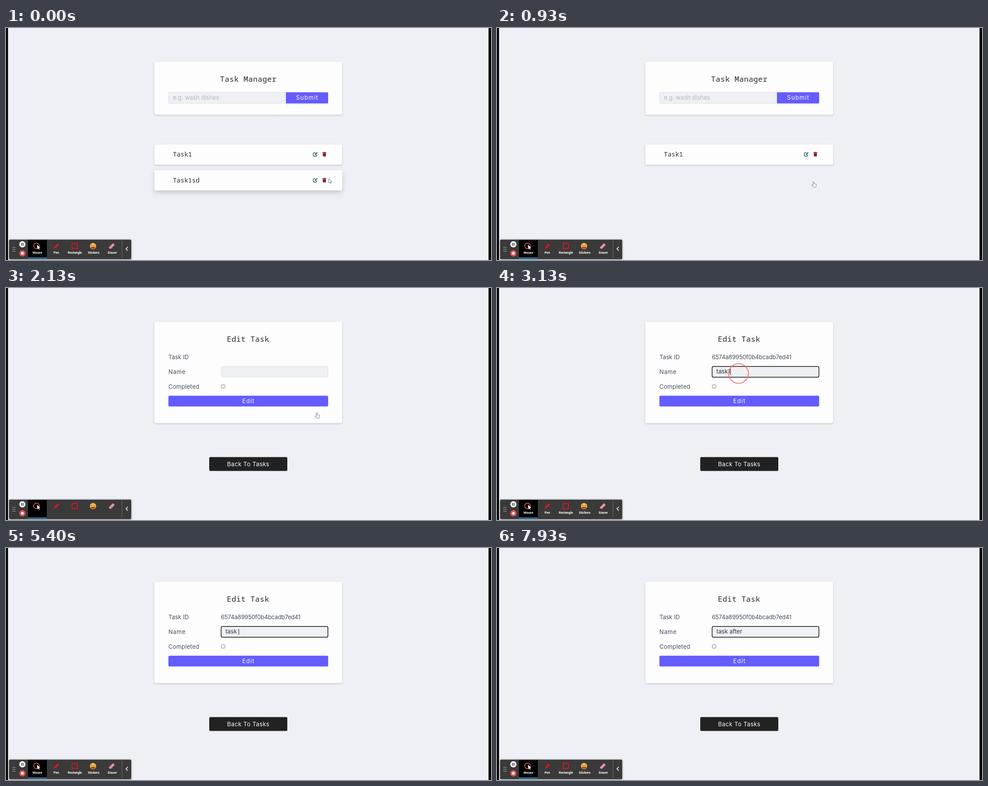
Animation, 1081 px wide and 518 px high, one loop 8000 ms. Source, as an HTML page:

```html
<!DOCTYPE html>
<html lang="en">
<head>
<meta charset="utf-8">
<title>Task Manager</title>
<style>
  html, body { margin: 0; width: 100%; height: 100%; overflow: hidden; background: #eff0f5; }
  svg { display: block; }
  text { font: 13px Inter, sans-serif; fill: #46505c; white-space: pre; }
  .mono { font-family: "Noto Sans Mono", monospace; fill: #2b2b2b; }
  .title { font-size: 17px; letter-spacing: .28px; text-anchor: middle; }
  .task { font-size: 14px; letter-spacing: .12px; }
  .btn { fill: #fff; letter-spacing: 1.2px; text-anchor: middle; }
  .card { fill: #fdfdfe; filter: drop-shadow(0 2px 2px rgba(0, 0, 0, .15)); }
  .hover .card { filter: drop-shadow(0 5px 6px rgba(0, 0, 0, .17)); }
  .field { fill: #eef0f4; stroke: #dce1e8; }
  .focus { stroke: #111; stroke-width: 1.5; }
  .accent { fill: #645cff; }
  .bar text { font: bold 7px Roboto, sans-serif; fill: #fff; text-anchor: middle; }
  .pointer { fill: #fff; stroke: #666a70; stroke-width: .9; stroke-linejoin: round; }
</style>
</head>
<body>
<svg width="1081" height="518" viewBox="0 0 1081 518">
  <defs>
    <g id="icons">
      <g fill="none" stroke="#1f594f" stroke-width="1.4">
        <path d="M690 278.6h-4.2q-.9 0-.9.9v5.6q0 .9.9.9h5.8q.9 0 .9-.9v-2.4"/>
        <path d="M688.6 283l5-5" stroke-width="2.4"/>
      </g>
      <path fill="#8a1c26" d="M705.3 277.6h2.3l.6-.8h2.8l.6.8h2.3v1.3h-8.6zM705.9 279.6h7.4l-.5 6.3q-.1.9-1 .9h-4.4q-.9 0-1-.9z"/>
    </g>
  </defs>
  <rect width="1081" height="518" fill="#eff0f5"/>

  <g id="list">
    <rect class="card" x="331" y="75.500" width="418" height="118" rx="3"/>
    <text class="mono title" x="540" y="119.500">Task Manager</text>
    <path class="field" d="M624 143.500h-259q-3 0-3 3v19q0 3 3 3h259z"/>
    <text x="372" y="160" style="fill:#b3b9c2">e.g. wash dishes</text>
    <path class="accent" d="M624 143.500h92q2 0 2 2v21q0 2-2 2h-92z"/>
    <text class="btn" x="671.500" y="160">Submit</text>
    <g id="first">
      <rect class="card" x="331" y="260" width="418" height="45" rx="3"/>
      <text class="mono task" x="372" y="287">Task1</text>
      <use href="#icons"/>
    </g>
    <g id="second" class="hover">
      <rect class="card" x="331" y="317.500" width="418" height="45" rx="3"/>
      <text class="mono task" x="372" y="345">Task1sd</text>
      <use href="#icons" y="58"/>
    </g>
  </g>

  <g id="edit">
    <rect class="card" x="331" y="75.500" width="418" height="226" rx="3"/>
    <text class="mono title" x="539.500" y="119.500">Edit Task</text>
    <text x="362" y="158.500">Task ID</text>
    <text x="362" y="191.500" letter-spacing=".6">Name</text>
    <text x="362" y="224.500" letter-spacing=".2">Completed</text>
    <text id="taskId" x="479" y="158.500" letter-spacing="-.2">6574a89950f0b4bcadb7ed41</text>
    <rect id="field" class="field" x="479.500" y="175.300" width="238" height="24" rx="3"/>
    <text id="value" x="489" y="191" style="fill:#30353b"></text>
    <path id="caret" d="M0 180.500v13.500" stroke="#111"/>
    <rect x="480" y="216" width="8" height="7.500" rx="1.500" fill="#fff" stroke="#777"/>
    <rect class="accent" x="362" y="240.500" width="356" height="24" rx="2.500"/>
    <text class="btn" x="540.500" y="256.500">Edit</text>
    <rect x="453" y="377.500" width="174" height="31" rx="2.500" fill="#222"/>
    <text class="btn" x="540" y="397.800" style="letter-spacing:.45px">Back To Tasks</text>
  </g>

  <path d="M0 0h4.500v518H0zM1075.500 0h5.500v518h-5.500z"/>

  <g class="bar">
    <rect x="7" y="472.500" width="272" height="43.500" rx="2" fill="#3a3a3b" style="filter:drop-shadow(0 1px 2px rgba(0,0,0,.5))"/>
    <path d="M49 473h42v40H49z"/>
    <path d="M49 512.500h42v2H49z" fill="#1d9bd8"/>
    <path d="M15.700 489v11M19.500 489v11" stroke="#bbb" stroke-width="1.800" stroke-dasharray="1.800 2.500"/>
    <circle cx="36.500" cy="483" r="7" fill="#f3f3f3"/>
    <path d="M34.800 480v6M38.200 480v6" stroke="#333" stroke-width="1.500"/>
    <circle cx="36.500" cy="503" r="7" fill="#e2534f"/>
    <rect x="33.700" y="500.200" width="5.600" height="5.600" rx=".6" fill="#fff"/>
    <circle cx="68" cy="486.500" r="6.300" fill="none" stroke="#f06b66" stroke-width="1.400"/>
    <path d="M69 484l1 10 2.100-2 1.400 2.700 1.500-.8-1.400-2.600 2.600-.7z" fill="#fff"/>
    <path d="M106 493l1.300-4 7-7.200q1-1 2 0l1.200 1.200q1 1 0 2l-7.300 6.700z" fill="#e3161c"/>
    <path d="M107.300 489l3 3" stroke="#3a3a3b" stroke-width=".8"/>
    <rect x="147.500" y="481" width="11.500" height="11.500" fill="none" stroke="#d9161b" stroke-width="2"/>
    <circle cx="194" cy="487" r="7" fill="#f6c244"/>
    <path d="M188.500 488.500h11q-1 5-5.500 5t-5.500-5z" fill="#d9453d"/>
    <path d="M189.500 486.300q1.500-2.500 3 0M195.500 486.300q1.500-2.500 3 0M191 490.300h6" fill="none" stroke="#5b3516"/>
    <path d="M229.200 489.800l8.300-8.600q1-1 2 0l2 2q1 1 0 2l-7.500 7.800h-2.300l-2.500-2.200q-.5-.5 0-1z" fill="#e58fa3"/>
    <path d="M232 486.900l4.500 4" stroke="#c9788d"/>
    <path d="M258.500 474v38" stroke="#707070"/>
    <path d="M271.500 488.800l-4.200 4.200 4.200 4.200" fill="none" stroke="#fff" stroke-width="1.600"/>
    <g id="labels">
      <text x="70" y="504.300">Mouse</text>
      <text x="112" y="504.300">Pen</text>
      <text x="153.500" y="504.300">Rectangle</text>
      <text x="195.500" y="504.300">Stickers</text>
      <text x="237" y="504.300">Eraser</text>
    </g>
  </g>

  <circle id="ring" r="22" fill="none" stroke="#ee6f6c" stroke-width="2.200"/>
  <path id="arrow" class="pointer" d="M.5.500v9.500l2.200-2 1.300 3 1.500-.7L4.200 7.400h3z"/>
  <path id="hand" class="pointer" d="M-1.200 1.200a1.200 1.200 0 0 1 2.400 0V4.600l4 .9q1.200.4 1 1.600l-.6 3.400-.8 1.800H-.8L-3.900 8.500q-.6-1.200.4-1.500l2.300 1.300z"/>
</svg>
<script>
  const LOOP = 8000;
  const $ = Object.fromEntries([...document.querySelectorAll('[id]')].map(e => [e.id, e]));

  const path = [[0, 719, 336], [400, 705.5, 343], [1260, 705.5, 343], [1780, 693, 278.5],
                [2200, 693, 278.5], [2930, 538.5, 191], [LOOP, 538.5, 191]];
  const pointer = [[0, 'arrow'], [300, 'hand'], [1330, 'arrow'], [1700, 'hand'], [2250, 'arrow'], [2860, '']];
  const typed = [[0, ''], [2330, 'task1'], [4200, 'task'], [4400, 'taska'], [4530, 'taskaf'], [4600, 'taskaft'],
                 [4860, 'taskaf'], [4930, 'taska'], [5060, 'task'], [5130, 'task '], [6130, 'task a'],
                 [6200, 'task af'], [6400, 'task aft'], [6530, 'task afte'], [6660, 'task after']];
  const blink = [[0, false], [3060, true], [3660, false], [4200, true], [5430, false], [5930, true],
                 [7060, false], [7600, true], [7860, false]];
  const clicks = [[530, 780], [1800, 2060], [3060, 3330]];

  const at = (steps, t) => steps.findLast(s => s[0] <= t)[1];
  const show = (el, on) => el.style.display = on ? '' : 'none';

  function position(t) {
    const i = path.findIndex(p => p[0] > t);
    const [t0, x0, y0] = path[i - 1], [t1, x1, y1] = path[i];
    const u = (t - t0) / (t1 - t0), k = u * u * (3 - 2 * u);
    return [x0 + (x1 - x0) * k, y0 + (y1 - y0) * k];
  }

  function draw(t) {
    const editing = t >= 2130, loaded = t >= 2330;
    show($.list, !editing);
    show($.edit, editing);
    show($.second, t < 930);
    $.first.classList.toggle('hover', t >= 1600);
    show($.labels, !editing || loaded);
    show($.taskId, loaded);
    $.field.classList.toggle('focus', t >= 3060);

    const text = at(typed, t), caret = editing && at(blink, t);
    $.value.textContent = text;
    show($.caret, caret);
    if (caret) $.caret.setAttribute('transform', `translate(${489.5 + $.value.getComputedTextLength()})`);

    const place = `translate(${position(t)})`, kind = at(pointer, t);
    for (const id of ['arrow', 'hand']) {
      show($[id], id === kind);
      $[id].setAttribute('transform', place);
    }
    const click = clicks.find(([a, b]) => t >= a && t < b);
    show($.ring, click);
    if (click) {
      $.ring.setAttribute('transform', place);
      $.ring.style.opacity = Math.min(.85, (click[1] - t) / 120);
    }
  }

  const start = performance.now();
  function tick() {
    draw((performance.now() - start + 4) % LOOP);
    requestAnimationFrame(tick);
  }
  tick();
</script>
</body>
</html>
```
